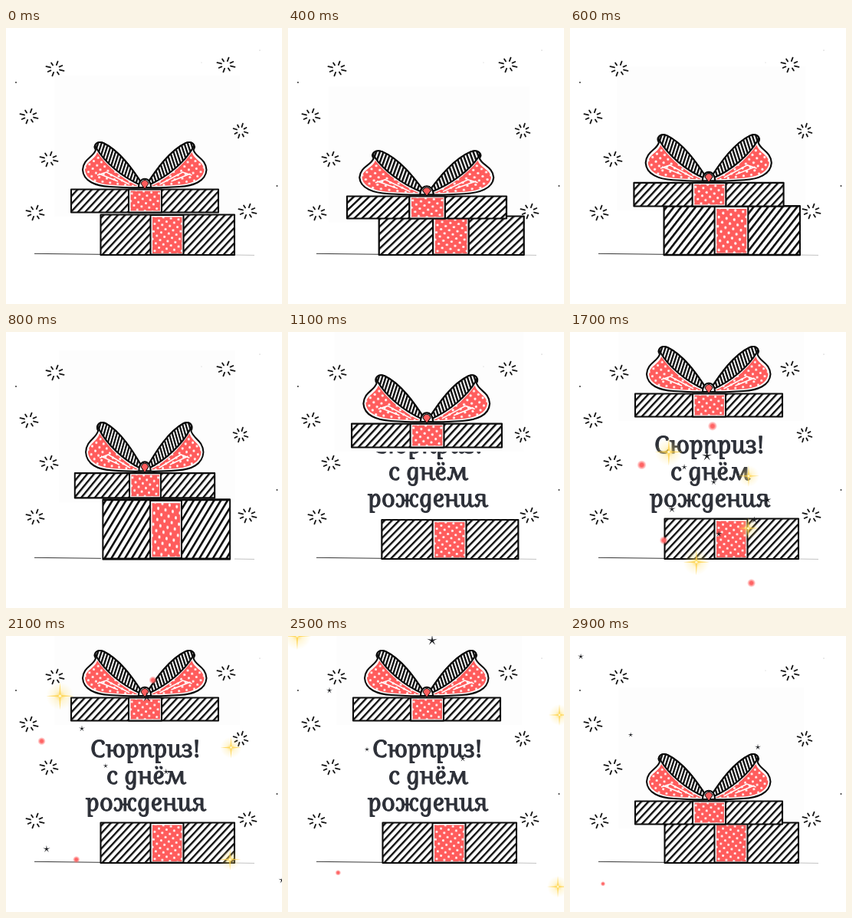
An HTML page for the animation above (3 s loop, 360x360 px).

```html
<!DOCTYPE html>
<html lang="ru">
<head>
<meta charset="utf-8">
<title>Сюрприз</title>
<style>
html, body { margin: 0; width: 100%; height: 100%; overflow: hidden; background: #fff; }
svg { display: block; width: 100vw; height: 100vh; }
text { font: italic 500 31px "Noto Serif", "DejaVu Sans", serif; fill: #2d3038; stroke: #2d3038; stroke-width: 1; stroke-linejoin: round; text-anchor: middle; }
.ink { stroke: #0b0b0b; stroke-width: 2.1; stroke-linejoin: round; stroke-linecap: round; }
</style>
</head>
<body>
<svg viewBox="0 0 360 360">
  <defs>
    <pattern id="hatch" width="6.8" height="6.8" patternUnits="userSpaceOnUse" patternTransform="rotate(43)">
      <rect width="6.8" height="6.8" fill="#fff"/><rect width="2.4" height="6.8" fill="#0b0b0b"/>
    </pattern>
    <pattern id="fine" width="4.2" height="4.2" patternUnits="userSpaceOnUse" patternTransform="rotate(18)">
      <rect width="4.2" height="4.2" fill="#fff"/><rect width="2.3" height="4.2" fill="#0b0b0b"/>
    </pattern>
    <pattern id="dots" width="10" height="10" patternUnits="userSpaceOnUse" patternTransform="translate(162 213) rotate(8)">
      <rect width="10" height="10" fill="#ff5c5c"/>
      <circle cx="2.5" cy="2.5" r="1.5" fill="#fff"/><circle cx="7.5" cy="7.5" r="1.5" fill="#fff"/>
    </pattern>
    <radialGradient id="ball">
      <stop offset=".35" stop-color="#ff6464"/><stop offset="1" stop-color="#ff6464" stop-opacity="0"/>
    </radialGradient>
    <radialGradient id="glow">
      <stop offset="0" stop-color="#ffd23c" stop-opacity=".75"/><stop offset=".4" stop-color="#ffe27a" stop-opacity=".3"/><stop offset="1" stop-color="#ffe78a" stop-opacity="0"/>
    </radialGradient>
    <g id="loop">
      <path class="ink" fill="#fff" d="M179 206C165 184 148 160 127 150C119 147 113 153 117 159C114 169 101 170 100 185C101 200 117 206 135 207C150 208 165 209 179 208Z"/>
      <path fill="url(#dots)" d="M119 162C116 172 104 174 103 185C104 197 118 203 135 204.500C150 205.500 163 206 172 206C150 196 131 179 119 162Z"/>
      <path fill="none" stroke="#fff" stroke-width="1.5" d="M119 192L131 188L161 204M121 190L146 200"/>
      <path class="ink" fill="url(#fine)" d="M178 204C165 184 148 160 127 150C119 147 114 152 118 157C128 174 150 194 176 205Z"/>
    </g>
    <path id="star" d="M0-1L.14-.19.95-.31.22.07.59.81 0 .23-.59.81-.22.07-.95-.31-.14-.19Z" fill="#15171b"/>
    <g id="gold">
      <circle r="1" fill="url(#glow)"/>
      <path fill="#ffd24a" opacity=".8" d="M0-1L.07-.07 1 0 .07 .07 0 1-.07 .07-1 0-.07-.07Z"/>
      <circle r=".1" fill="#fff6c8"/>
    </g>
    <circle id="red" r="1" fill="url(#ball)"/>
  </defs>
  <path d="M37 294.300L124 295.300" stroke="#222" stroke-width=".9"/>
  <path d="M298 296L324 296.400" stroke="#999" stroke-width=".6"/>
  <!-- cursive letter forms, set upright -->
  <g id="words">
    <text transform="translate(184 158) skewX(12)">Сюрприз!</text>
    <text transform="translate(184.500 193) skewX(12)">с <tspan lang="sr">д</tspan>нём</text>
    <text transform="translate(184 228) skewX(12)">рож<tspan lang="sr">д</tspan>ения</text>
  </g>
  <rect id="panel" x="63" y="62" width="242" height="184" fill="#fdfdfd"/>
  <g id="base">
    <rect class="ink" x="123.500" y="243.500" width="174.500" height="52.500" fill="url(#hatch)"/>
    <rect class="ink" x="188.500" y="244" width="43" height="51.500" fill="#fff"/>
    <rect x="191" y="246.500" width="38.500" height="47.500" fill="url(#dots)"/>
  </g>
  <g id="lid">
    <rect class="ink" x="85" y="210.500" width="192" height="30" fill="url(#hatch)"/>
    <rect class="ink" x="160" y="210.500" width="43" height="30" fill="#fff"/>
    <rect x="162.500" y="212.500" width="38.500" height="26" fill="url(#dots)"/>
    <use href="#loop"/>
    <use href="#loop" transform="translate(361.500) scale(-1 1)"/>
    <path class="ink" fill="#fff" d="M173 208C173 193 189 193 189 208Z"/>
    <path fill="#ff5c5c" d="M176 203C178 197 184 197 186 203L181 210Z" stroke="#0b0b0b" stroke-width="1"/>
  </g>
  <g id="marks" fill="none" stroke="#151515" stroke-width="1.800" stroke-linecap="round"></g>
  <g fill="#222">
    <circle cx="13" cy="71" r=".9"/><circle cx="353.500" cy="206" r=".9"/>
    <circle cx="331" cy="29" r=".6" opacity=".4"/><circle cx="255" cy="45" r=".6" opacity=".25"/>
  </g>
  <g id="bits"></g>
</svg>
<script>
const NS = 'http://www.w3.org/2000/svg';
const $ = id => document.getElementById(id);
const add = (parent, tag, attrs) => {
  const el = parent.appendChild(document.createElementNS(NS, tag));
  for (const k in attrs) el.setAttribute(k, attrs[k]);
  return el;
};

function mark(x, y, w) {
  let d = '';
  for (let i = 0; i < 8; i++) {
    const a = i * Math.PI / 4 + 0.3, c = Math.cos(a) * w, s = Math.sin(a) * 0.85;
    const r = i % 2 ? 10 : 11.5;
    d += `M${x + c * 6} ${y + s * 6}L${x + c * r} ${y + s * r}`;
  }
  add($('marks'), 'path', { d });
}
[[64, 53, 1.05], [287, 48, 1.05], [30, 115, 1.05], [306, 134, .85], [56, 171, 1.05], [38, 241, 1.05], [315, 239, 1.05]]
  .forEach(m => mark(...m));

// time, width scale, base height scale, lid shift, lid height scale
const keys = [
  [0, 1, 1, 0, 1], [400, 1.083, .96, 8, .965], [800, .95, 1.47, -24, 1.076],
  [1100, 1.02, .97, -90, 1.03], [1300, 1, 1, -118, 1], [1500, 1, 1, -130, 1],
  [2500, 1, 1, -130, 1], [2600, 1, 1, -106, 1], [2700, 1, 1, -62, 1],
  [2800, 1, 1, -14, 1], [2900, 1, 1, 5, 1], [3000, 1, 1, 0, 1]
];
function pose(t) {
  const i = keys.findIndex(k => k[0] > t), a = keys[i - 1], b = keys[i];
  let u = (t - a[0]) / (b[0] - a[0]);
  if (t < 800) u = u * u * (3 - 2 * u);
  return a.map((v, j) => v + (b[j] - v) * u);
}

// each kind: origin, travel and size over time in seconds
const kinds = {
  red: { x: 176, y: 237, go: s => 1.8 * (s - 1.1) - .24 * (s - 1.1) ** 2, scale: s => Math.max(3.6, 6.2 - Math.max(0, s - 1.7) * 2.4) },
  star: { x: 176, y: 206, go: s => 1.13 * (s - 1.5) - .13 * (s - 1.5) ** 2, scale: () => 1 },
  gold: { x: 180, y: 225, go: s => (s - 1.35) / 1.15, scale: () => 1 }
};
// kind, direction x and y, size, first and last moment
const bits = [
  ['red', 10, -115, 1, 1200, 2300], ['red', -83, -64, 1, 1200, 2300],
  ['red', -54, 35, .9, 1200, 3000], ['red', 61, 91, .9, 1500, 2300],
  ['star', 12, -200, 7, 1500, 2800], ['star', -122, -135, 4.2, 1500, 3000],
  ['star', -73, -58, 3.5, 1500, 3000], ['star', 52, -46, 4.2, 1500, 3000],
  ['star', 370, 59, 5, 1500, 2500], ['star', 292, 178, 5, 1500, 2500],
  ['star', 82, 260, 4.5, 1500, 2500], ['star', -195, 114, 5, 1500, 2500],
  ['gold', -168, -225, 18, 1400, 2600], ['gold', 174, -122, 14, 1400, 2600],
  ['gold', 172, 102, 14, 1400, 2600], ['gold', -50, 247, 17, 1400, 2600]
].map(([kind, dx, dy, size, from, to]) =>
  ({ ...kinds[kind], dx, dy, size, from, to, el: add($('bits'), 'use', { href: '#' + kind }) }));

const show = (el, on) => el.setAttribute('display', on ? 'inline' : 'none');

function draw(t) {
  const [, sx, by, shift, ly] = pose(t);
  const about = (y, dy, h) => `translate(181 ${y + dy}) scale(${sx} ${h}) translate(-181 ${-y})`;
  $('base').setAttribute('transform', about(296, 0, by));
  $('lid').setAttribute('transform', about(241, shift, ly));
  $('panel').setAttribute('transform', about(241, shift, ly));
  show($('words'), t >= 900 && t < 2900);
  const s = t / 1000;
  for (const b of bits) {
    const on = t >= b.from && t < b.to;
    show(b.el, on);
    if (!on) continue;
    const k = b.go(s);
    b.el.setAttribute('transform', `translate(${b.x + b.dx * k} ${b.y + b.dy * k}) scale(${b.size * b.scale(s)})`);
  }
}

function tick() {
  draw(Math.floor(performance.now() % 3000 / 100) * 100);
  requestAnimationFrame(tick);
}
tick();
</script>
</body>
</html>
```
